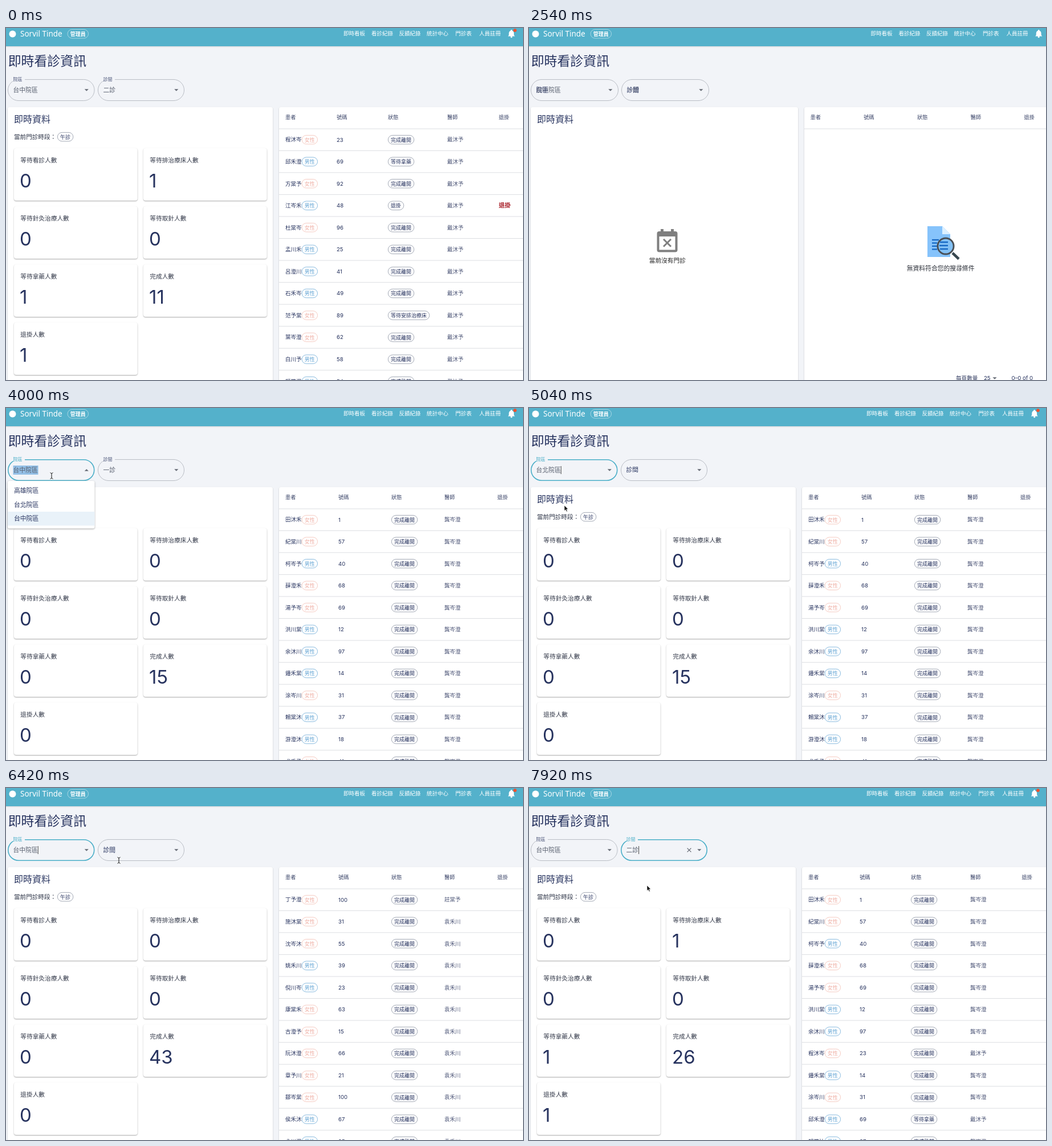
Recreate the animation shown at these times as an HTML page with a canvas. Size 907 px wide and 618 px high, loop 8000 ms.

```html
<!DOCTYPE html>
<html lang="zh-Hant">
<head>
<meta charset="utf-8">
<style>
html, body { margin: 0; width: 100%; height: 100%; overflow: hidden; background: #f2f4f8; }
canvas { display: block; width: 907px; height: 618px; }
</style>
</head>
<body>
<canvas id="stage" width="907" height="618"></canvas>
<script>
const ctx = document.getElementById('stage').getContext('2d');
const LOOP = 8000;
const FONT = 'Inter, "Noto Sans CJK TC", "Noto Sans CJK", sans-serif';
const BRAND_FONT = '"Noto Sans", sans-serif';
const NAVY = '#27335f', GREY = '#59606f', TEAL = '#4bafc8', BG = '#f2f4f8', LINE = '#dcdee2';

// Moments of the story, in ms
const T = {
  reload: 2540, badge: 2700, spin1: 2910, loaded: 3380, open1: 3830, pickNorth: 4900,
  spin2: 5170, north: 5250, open2: 5560, pickMid: 5930, all: 6380,
  open3: 6880, pickRoom: 7460, done: 7560
};

const DONE = '完成離開';
function makeRows(names, sexes, nums, doctor, special = {}) {
  return names.split(' ').map((name, i) => ({
    name, doctor, female: sexes[i] === 'F', num: nums[i], status: DONE, ...special[i]
  }));
}
const roomTwo = makeRows(
  '程沐岑 邱禾澄 方棠予 江岑禾 杜棠岑 孟川禾 呂澄川 石禾岑 范予棠 葉岑澄 白川予 顧棠澄',
  'FMFMFMMMFFMM', [23, 69, 92, 48, 96, 25, 41, 49, 89, 62, 58, 54], '戴沐予',
  { 1: { status: '等待拿藥' }, 3: { status: '退掛', off: true }, 8: { status: '等待安排治療床' } });
const roomOne = makeRows(
  '田沐禾 紀棠川 柯岑予 薛澄禾 湯予岑 洪川棠 余沐川 鍾禾棠 涂岑川 賴棠沐 游澄沐 尤禾予',
  'FFMFFMMMFMMF', [1, 57, 40, 68, 69, 12, 97, 14, 31, 37, 18, 41], '龔岑澄');
const everyRoom = makeRows(
  '丁予澄 施沐棠 沈岑沐 姚禾川 倪川岑 康棠禾 古澄予 阮沐澄 章予川 鄒岑棠 侯禾沐 俞川澄',
  'FFFMMFFFFFMM', [100, 31, 55, 39, 23, 63, 15, 66, 21, 100, 67, 95], '袁禾川',
  { 0: { doctor: '莊棠予' } });
const mixed = [...roomOne.slice(0, 7), roomTwo[0], ...roomOne.slice(7, 9), roomTwo[1], roomOne[9]];

const COLS_A = [490, 580, 670, 774, 864.5];
const COLS_B = [490, 583, 676, 769, 862];
const COLS_WIDE = [493.5, 587, 681, 774.5, 868.5];

const clamp = v => Math.max(0, Math.min(1, v));
const smooth = v => v * v * (3 - 2 * v);
const easeOut = v => 1 - (1 - v) ** 3;
const between = (t, a, b) => t >= a && t < b;
const ramp = (t, start, len = 200) => easeOut(clamp((t - start) / len));

function text(s, x, cy, size, color = NAVY, weight = 400, family = FONT) {
  ctx.font = `${weight} ${size}px ${family}`;
  ctx.fillStyle = color;
  ctx.fillText(s, x, cy + size * 0.365);
}
function box(x, y, w, h, r) {
  ctx.beginPath();
  ctx.roundRect(x, y, w, h, r);
}
function poly(points, fill) {
  ctx.beginPath();
  points.forEach(([x, y]) => ctx.lineTo(x, y));
  ctx.closePath();
  if (fill) { ctx.fillStyle = fill; ctx.fill(); }
}
function line(x1, y1, x2, y2, color, width = 1) {
  ctx.strokeStyle = color;
  ctx.lineWidth = width;
  ctx.beginPath();
  ctx.moveTo(x1, y1);
  ctx.lineTo(x2, y2);
  ctx.stroke();
}
function dot(x, y, r, fill) {
  ctx.fillStyle = fill;
  ctx.beginPath();
  ctx.arc(x, y, r, 0, 7);
  ctx.fill();
}
function paper(x, y, w, h, r = 4, blur = 2, alpha = 0.35) {
  ctx.save();
  ctx.shadowColor = `rgba(0,0,0,${alpha})`;
  ctx.shadowBlur = blur;
  ctx.shadowOffsetY = 1;
  ctx.fillStyle = '#fff';
  box(x, y, w, h, r);
  ctx.fill();
  ctx.restore();
}
function chip(s, x, cy, border, color, weight = 500) {
  ctx.strokeStyle = border;
  ctx.lineWidth = 0.8;
  box(x + 0.4, cy - 7.6, s.length * 9 + 9.4, 15.4, 7.7);
  ctx.stroke();
  text(s, x + 5, cy + 0.3, 9, color, weight);
}
function caretIcon(x, y, up, color = '#666b75') {
  const d = up ? -1.8 : 1.8;
  poly([[x - 3.6, y - d], [x + 3.6, y - d], [x, y + d]], color);
}

function header(dx, badge) {
  paper(-5, -5, 917, 37, 0, 2, 0.15);
  ctx.fillStyle = '#54b1cb';
  ctx.fillRect(0, 0, 907, 32);
  dot(11.5, 10.5, 6, '#fff');
  text('Sorvil Tinde', 25, 10.5, 13.5, '#fff', 400, BRAND_FONT);
  ctx.strokeStyle = 'rgba(255,255,255,.6)';
  ctx.lineWidth = 0.8;
  box(108, 2.5, 36.5, 15.5, 7.75);
  ctx.stroke();
  text('管理員', 112.8, 10.5, 9, '#fff', 700);
  ['即時看板', '看診紀錄', '反饋紀錄', '統計中心', '門診表', '人員註冊'].forEach((s, i) =>
    text(s, [592, 641, 689.5, 738, 788.5, 830][i] + dx, 10, 9.5, '#fff', 500));
  const x = 886.7 + dx;
  ctx.fillStyle = '#fff';
  ctx.beginPath();
  ctx.moveTo(x - 6, 14.5);
  ctx.lineTo(x - 4.5, 12.5);
  ctx.bezierCurveTo(x - 4.5, 7, x - 4.2, 5, x, 4.4);
  ctx.bezierCurveTo(x + 4.2, 5, x + 4.5, 7, x + 4.5, 12.5);
  ctx.lineTo(x + 6, 14.5);
  ctx.fill();
  dot(x, 4.4, 1.3, '#fff');
  dot(x, 15.6, 1.6, '#fff');
  if (badge) dot(x + 6.2, 4.1, 2.9, '#f0502c');
}

function select(o) {
  const { x, w, label, value, lift, focus, open } = o;
  const edge = focus ? 1.6 : 0.9;
  ctx.strokeStyle = focus ? TEAL : '#b3b7bf';
  ctx.lineWidth = edge;
  box(x + edge / 2, 90 + edge / 2, w - edge, 38 - edge, 19 - edge / 2);
  ctx.stroke();
  if (lift > 0.3) {
    ctx.fillStyle = BG;
    ctx.fillRect(x + 8, 88, 22 * lift, 5);
  }
  if (o.marked) {
    ctx.fillStyle = '#93bfe6';
    ctx.fillRect(x + 9.5, 101, 44, 16);
  }
  text(value, x + 9.5, 109, 10.8, GREY);
  text(label, x + 9.5, 109 - 19 * lift, 10.8 - 2.8 * lift, focus ? TEAL : lift < 0.5 ? NAVY : '#4a5478');
  if (o.caret) {
    const cx = x + 10 + value.length * 10.8;
    line(cx, 102, cx, 116, '#333', 0.9);
  }
  if (o.clear) {
    const cx = x + 120;
    line(cx - 3.4, 105.6, cx + 3.4, 112.4, '#666b75', 1.3);
    line(cx + 3.4, 105.6, cx - 3.4, 112.4, '#666b75', 1.3);
  }
  caretIcon(x + w - 14.2, 109, open);
}
function menu(x, options, picked) {
  paper(x, 128, 152.5, 10 + options.length * 24.5, 3, 3, 0.35);
  options.forEach((s, i) => {
    if (i === picked) {
      ctx.fillStyle = '#e9f2f9';
      ctx.fillRect(x, 133 + i * 24.5, 152.5, 24.5);
    }
    text(s, x + 11, 145.5 + i * 24.4, 10.8, NAVY, 500);
  });
}

function cards(counts) {
  text('當前門診時段：', 14, 191, 10.6, '#2e3548');
  chip('午診', 90, 191, '#8c93a3', NAVY);
  ['等待看診人數', '等待排治療床人數', '等待針灸治療人數', '等待取針人數', '等待拿藥人數', '完成人數', '退掛人數']
    .forEach((s, i) => {
      const x = 14 + (i % 2) * 227, y = 211 + (i >> 1) * 102;
      paper(x, y, 216.7, 92);
      text(s, x + 11.3, y + 20.7, 10.7, '#343a4a');
      text(String(counts[i]), x + 10, y + 57, 33, NAVY);
    });
}
function noClinic() {
  const grey = '#7f7f7f';
  ctx.fillStyle = grey;
  ctx.fillRect(231, 353, 5, 8);
  ctx.fillRect(249, 353, 5, 8);
  box(224.5, 357, 36, 36.5, 4);
  ctx.fill();
  ctx.fillStyle = '#fff';
  ctx.fillRect(228.5, 366, 28, 23.5);
  line(236, 370.7, 249, 383.7, grey, 3);
  line(249, 370.7, 236, 383.7, grey, 3);
  text('當前沒有門診', 210.7, 408.5, 10.7, '#222', 500);
}
function noData() {
  poly([[699, 348], [725, 348], [739, 362], [739, 402], [699, 402]], '#86c3fb');
  poly([[725, 348], [739, 362], [725, 362]], '#dcf0ff');
  [371, 376.5, 382, 387.5].forEach((y, i) => line(707, y + 1, i % 2 ? 716 : 719, y + 1, '#1769c4', 2.3));
  line(743, 395, 754, 405.5, '#37474f', 4.5);
  dot(731, 383, 15.5, '#4a4f55');
  dot(731, 383, 12.6, '#83c1f5');
  line(721, 376, 735, 376, '#1769c4', 2.5);
  line(720, 382, 735, 382, '#1769c4', 2.5);
  line(721, 388, 735, 388, '#1769c4', 2.5);
  text('無資料符合您的搜尋條件', 662.7, 422.5, 10.8, '#2b2f38');
}

function table(cols, rows, faded) {
  ['患者', '號碼', '狀態', '醫師', '退掛'].forEach((s, i) => text(s, cols[i], 157, 9.3, '#3a4468'));
  line(cols[0] - 11, 177, 907, 177, LINE);
  if (!rows) return;
  rows.forEach((r, i) => {
    const y = 196 + i * 38.55;
    line(479, y + 19.3, 907, y + 19.3, LINE);
    ctx.globalAlpha = faded ? 0.62 : 1;
    text(r.name, cols[0], y, 9.5, NAVY, 500);
    if (r.female) chip('女性', 518.7, y, '#f3bdb2', '#efaea3', 400);
    else chip('男性', 518.7, y, '#6aa9d6', '#62a4d4', 400);
    text(String(r.num), cols[1], y, 9.6);
    chip(r.status, cols[2], y, '#8c93a3', NAVY);
    text(r.doctor, cols[3], y, 9.5, '#4a5375');
    if (r.off) text('退掛', cols[4], y, 10.5, '#a81f28', 700);
    ctx.globalAlpha = 1;
  });
}
function spinner(x, y, age) {
  const f = (age / 1400) % 1;
  const a = smooth(clamp(f * 2)), b = smooth(clamp(f * 2 - 1));
  const from = 15 * a + 110 * b;
  const to = Math.min(from + 1 + 99 * a, 126.9);
  const turn = v => (f + v / 126.9) * Math.PI * 2;
  ctx.strokeStyle = TEAL;
  ctx.lineWidth = 2.3;
  ctx.beginPath();
  ctx.arc(x, y, 12.6, turn(from), turn(to));
  ctx.stroke();
}

// time, x, y, shape once there
const PATH = [
  [3480, 300, 330, 'arrow'], [3780, 80, 119, 'beam'], [4210, 80, 119, 'beam'], [4540, 62, 171, 'hand'],
  [4900, 62, 171, 'arrow'], [5250, 62, 171, 'arrow'], [5500, 64, 116, 'beam'], [5590, 64, 116, 'beam'],
  [5760, 60, 190, 'hand'], [5930, 60, 190, 'arrow'], [6050, 60, 190, 'arrow'], [6380, 198, 127, 'beam'],
  [6930, 198, 127, 'beam'], [7200, 205, 170, 'hand'], [7460, 205, 170, 'arrow'], [7670, 205, 170, 'arrow'],
  [7900, 207, 171, 'arrow'], [8000, 207, 171, 'arrow']
];
function pointer(t) {
  const i = PATH.findIndex(p => p[0] > t);
  if (i < 1) return;
  const a = PATH[i - 1], b = PATH[i];
  const raw = (t - a[0]) / (b[0] - a[0]), k = smooth(raw);
  const shape = raw > 0.6 && a[1] !== b[1] ? b[3] : a[3];
  ctx.save();
  ctx.translate(a[1] + (b[1] - a[1]) * k, a[2] + (b[2] - a[2]) * k);
  ctx.lineJoin = 'round';
  if (shape === 'beam') {
    line(0, -4, 0, 4, '#222', 1.1);
    for (const s of [-1, 1]) {
      line(0, 4 * s, -2.5, 5.5 * s, '#222');
      line(0, 4 * s, 2.5, 5.5 * s, '#222');
    }
  } else if (shape === 'hand') {
    poly([[-3, -6], [-1.2, -6], [-0.8, -2], [3.5, -1], [5, 0.5], [4, 5.5], [-1.5, 5.5], [-5, 0.5], [-3.8, -0.5], [-2.2, 1]], '#fff');
    ctx.strokeStyle = '#222';
    ctx.lineWidth = 1;
    ctx.stroke();
    line(0.6, 1, 0.8, 4, '#222', 0.7);
    line(2.5, 1, 2.4, 4, '#222', 0.7);
  } else {
    poly([[0, 0], [0, 9.5], [2.2, 7.5], [3.8, 11], [5.4, 10.2], [3.8, 6.9], [6.6, 6.6]], '#111');
    ctx.strokeStyle = '#fff';
    ctx.lineWidth = 0.6;
    ctx.stroke();
  }
  ctx.restore();
}

function dataAt(t) {
  if (t < T.reload) return [roomTwo, [0, 1, 0, 0, 1, 11, 1], COLS_A];
  if (t < T.loaded) return [null, null, COLS_WIDE];
  if (t < T.all) return [roomOne, [0, 0, 0, 0, 0, t < T.north ? 15 : 19, 0], COLS_B];
  if (t < T.done) return [everyRoom, [0, 0, 0, 0, 0, 43, 0], COLS_B];
  return [mixed, [0, 1, 0, 0, 1, 26, 1], COLS_A];
}

function draw(t) {
  const wide = between(t, T.reload, T.loaded);
  const [rows, counts, cols] = dataAt(t);
  ctx.fillStyle = BG;
  ctx.fillRect(0, 0, 907, 618);
  header(wide ? 7.5 : 0, !between(t, T.reload, T.badge));
  text('即時看診資訊', 3.7, 57.5, 22.9);

  const loadLift = t < T.reload ? 1 : ramp(t, T.reload + 20);
  const focus1 = between(t, T.open1, T.open3), focus2 = t >= T.open3;
  const menu1 = between(t, T.open1, T.pickNorth) || between(t, T.open2, T.pickMid);
  const menu2 = between(t, T.open3, T.pickRoom);
  const north = between(t, T.pickNorth, T.pickMid);
  const blink = since => t >= since && (t - since) % 1000 < 500;
  select({
    x: 3, w: wide ? 154 : 152.5, label: '院區', value: north ? '台北院區' : '台中院區',
    lift: loadLift, focus: focus1, open: menu1, marked: between(t, T.open1, T.pickNorth),
    caret: focus1 && blink(t < T.pickMid ? T.pickNorth : T.pickMid)
  });
  const room = t < T.reload || t >= T.pickRoom ? '二診' : t < T.pickNorth ? '一診' : '';
  const lift2 = t < T.pickNorth ? loadLift : t < T.open3 ? 1 - ramp(t, T.pickNorth) : ramp(t, T.open3);
  select({
    x: wide ? 162 : 161, w: wide ? 154 : 152, label: '診間', value: room, lift: lift2,
    focus: focus2, open: menu2, clear: t >= T.pickRoom,
    caret: focus2 && blink(t < T.pickRoom ? T.open3 : T.pickRoom)
  });

  paper(3, 139, wide ? 469 : 465, 500, 3, 2, 0.25);
  text('即時資料', 14, 160.5, 16);
  if (counts) cards(counts);
  else noClinic();

  paper(wide ? 483 : 479, 139, 450, 500, 3, 2, 0.25);
  const busy = between(t, T.spin2, T.all) || between(t, T.pickRoom, T.done);
  table(cols, rows, busy);
  if (wide) {
    if (t < T.spin1) noData();
    else spinner(716, 385, t - T.spin1);
    text('每頁數量', 749, 614.5, 9.6, '#3a4468');
    text('25', 798, 614, 9.6);
    caretIcon(817, 615, false);
    text('0–0 of 0', 846.5, 614.5, 9.6);
  } else if (busy) {
    spinner(711, 465, t - (t < T.all ? T.spin2 : T.pickRoom));
  }

  if (menu1) menu(3, ['高雄院區', '台北院區', '台中院區'], north ? 1 : 2);
  if (menu2) menu(161, ['一診', '二診', '三診'], -1);
  pointer(t);
}

function tick(now) {
  draw(now % LOOP);
  requestAnimationFrame(tick);
}
draw(0);
requestAnimationFrame(tick);
</script>
</body>
</html>
```
